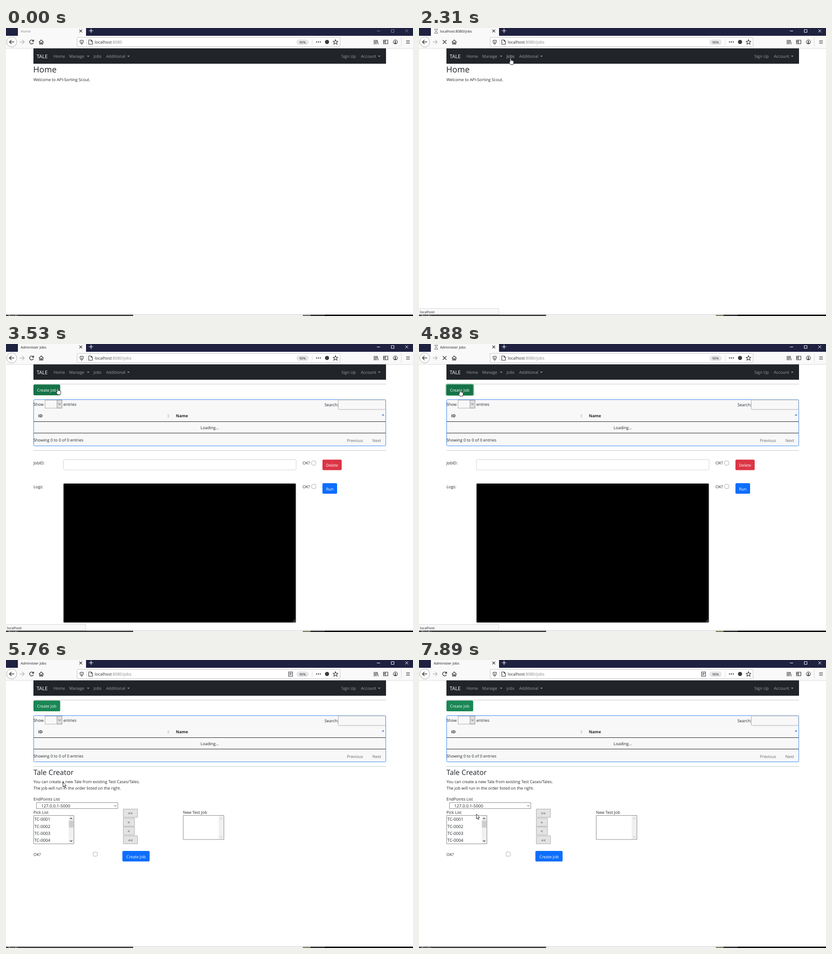
These frames come from a looping animation (890 by 629 pixels, 7990 ms). An HTML page:

```html
<!DOCTYPE html>
<html lang="en">
<head>
<meta charset="utf-8">
<title>Administer Jobs</title>
<style>
html, body { margin: 0; width: 100%; height: 100%; overflow: hidden; background: #fff; }
svg { display: block; width: 890px; height: 629px; font: 8.85px "Open Sans", "Noto Sans", sans-serif; fill: #212529; text-rendering: geometricPrecision; }
text { white-space: pre; }
.small { font-size: 7.7px; }
.num { font-size: 9.25px; }
.mid { text-anchor: middle; }
.white { fill: #fff; }
.nav { fill: #9a9da0; }
.bold { font-weight: 700; }
.line { fill: none; stroke: #3a3a3e; stroke-width: 1.2; }
.box { fill: #fff; stroke: #8a8a8a; stroke-width: 1; }
.field { fill: #fff; stroke: #ced4da; }
.key { fill: #e3e3e3; stroke: #adadad; }
.rule { stroke: #c4c5c6; }
.blue { fill: #0d6efd; }
</style>
</head>
<body>
<svg viewBox="0 0 890 629">
  <!-- browser window -->
  <path fill="#1f2140" d="M0 0H890V17H0Z"/>
  <path fill="#f9f9fa" d="M26 0H175V17H890V44H0V17H26Z"/>
  <path stroke="#dcdcde" d="M0 44.5H890"/>
  <text class="small" id="tab" x="32" y="10"></text>
  <path class="line" id="glass" stroke-width="1" d="M33.5 2.5H41.5M33.5 11.5H41.5M35 3V5L40 9V11M40 3V5L35 9V11" style="stroke:#777;stroke-width:1"/>
  <path class="line" d="M160.500 3.500L166.500 9.500M166.500 3.500L160.500 9.500"/>
  <path stroke="#fff" stroke-width="1.2" d="M181.500 6H190.500M186 1.500V10.500"/>
  <path id="controls" fill="none" d="M811 6.500H818M842.500 3.500H848.500V9.500H842.500ZM873 3L879.500 9.500M879.500 3L873 9.500"/>

  <circle cx="12.500" cy="30.500" r="11" fill="#fff" stroke="#aaa"/>
  <path class="line" style="stroke-width:1.5" d="M18 30.500H8M12 26L7.500 30.500L12 35"/>
  <path class="line" style="stroke:#b8b8ba;stroke-width:1.4" d="M30 30.500H39.500M35.500 26L40 30.500L35.500 35"/>
  <path class="line" id="reload" style="stroke-width:1.4" d="M59.500 28A4.300 4.300 0 1 0 60 32M60.500 25.500V29H57"/>
  <path class="line" id="stop" style="stroke-width:1.4" d="M52 26.500L60 34.500M60 26.500L52 34.500"/>
  <path class="line" style="stroke-width:1.4" d="M72 31L77 26L82 31M73.500 30V35H76V32H78V35H80.500V30"/>

  <rect x="155.500" y="20.500" width="575" height="20" rx="1.500" fill="#fff" stroke="#c8c8ca"/>
  <path class="line" d="M162 27Q165.500 27 165.500 26Q165.500 27 169 27Q169.500 33 165.500 35.500Q161.500 33 162 27M165.500 29V33"/>
  <path stroke="#d8d8da" d="M176.500 24V37M669.500 24V37M864.500 20V41"/>
  <path class="line" d="M181 26H186L189 29V35.500H181ZM186 26V29H189"/>
  <text x="194" y="34">localhost<tspan id="path" fill="#858588"></tspan></text>
  <path class="line" id="reader" d="M618 26H626.500V35.500H618ZM620 28.500H624.500M620 30.500H624.500M620 32.500H623"/>
  <rect x="635" y="25" width="27" height="12" rx="6" fill="#e6e6e9"/>
  <text class="mid" x="648.500" y="33.600" font-size="7.200">90%</text>
  <g fill="#3a3a3e"><circle cx="679" cy="30.500" r="1.300"/><circle cx="683.200" cy="30.500" r="1.300"/><circle cx="687.400" cy="30.500" r="1.300"/><circle cx="702" cy="30.500" r="4.500"/></g>
  <path class="line" d="M720.500 25.500L722 29H725.500L723 31.500L724 35.500L720.500 33.300L717 35.500L718 31.500L715.500 29H719Z"/>
  <path class="line" d="M805 26V35.500M807.500 26V35.500M810 26V35.500M811.500 26.500L814 35.500M825.500 26.500H835V34.500H825.500ZM829.500 26.500V34.500M826 29H829M826 31H829"/>
  <circle class="line" cx="851.500" cy="30.500" r="4.500"/>
  <path fill="#3a3a3e" d="M849 34Q849 31.500 851.500 31.500T854 34ZM850 29.300a1.500 1.500 0 1 1 3 0a1.500 1.500 0 1 1 -3 0"/>
  <path class="line" d="M875 27.500H883M875 30.500H883M875 33.500H883"/>

  <!-- site navigation -->
  <path fill="#212529" d="M60 44.500H831V78H60Z"/>
  <text class="white" x="67" y="66" font-size="11">TALE</text>
  <g class="nav">
    <text x="104" y="65">Home</text><text x="138" y="65">Manage</text>
    <text id="jobs" x="191.500" y="65">Jobs</text><text x="219" y="65">Additional</text>
    <text x="733.500" y="65">Sign Up</text><text x="776" y="65">Account</text>
    <path d="M177 60.500h5.400l-2.700 2.700zM265 60.500h5.400l-2.700 2.700zM813.500 60.500h5.400l-2.700 2.700z"/>
  </g>

  <g id="home">
    <text x="59.500" y="97" font-size="18">Home</text>
    <text x="60" y="116">Welcome to API-Sorting Scout.</text>
  </g>

  <g id="admin">
    <path class="rule" d="M60 87.500H831M60 232.500H831"/>
    <rect id="ring" x="58" y="86.500" width="62.500" height="27" rx="4" fill="#8cc3a9"/>
    <rect id="create" x="60" y="88.500" width="58.500" height="23.500" rx="2.500"/>
    <text class="mid white" x="89" y="104">Create Job</text>
    <rect x="60.500" y="121.500" width="770" height="101" rx="2" fill="#f8f8f8" stroke="#3d88ec"/>
    <text x="60" y="135">Show</text>
    <rect x="85.500" y="122.500" width="37" height="17.500" fill="#f8f8f8" stroke="#aaa"/>
    <path fill="#dedede" stroke="#999" d="M111.500 122.500h11v17.500h-11z"/>
    <path class="line" d="M114.500 130l2.500 2.500l2.500 -2.500" style="stroke-width:1"/>
    <text x="125.500" y="135">entries</text>
    <text x="696.500" y="136">Search:</text>
    <rect x="726.500" y="122" width="103.500" height="21" rx="1.500" fill="#f8f8f8" stroke="#aaa"/>
    <text class="bold" x="70.500" y="160">ID</text><text class="bold" x="371.500" y="160">Name</text>
    <g id="sort"><path fill="#cfcfd2" d="M352.500 156.500l2.500 -3.500l2.500 3.500zM352.500 157.500h5l-2.500 3.500z"/><path fill="#6f8fd0" d="M821.500 156.500l3 -4l3 4z"/></g>
    <path stroke="#222" d="M61 169.500H830M61 194.500H830"/>
    <text class="mid" x="445.500" y="185.500">Loading...</text>
    <text x="60" y="213">Showing 0 to 0 of 0 entries</text>
    <text x="745.500" y="213.500" fill="#666">Previous</text><text x="801" y="213.500" fill="#666">Next</text>
  </g>

  <g id="logs">
    <text x="60" y="263">JobID:</text><text x="60" y="315">Logs:</text>
    <rect class="field" x="125.500" y="252.500" width="509" height="22.500" rx="2.500"/>
    <rect x="125.500" y="304.500" width="508.500" height="304" rx="2" stroke="#b8bcc0" fill="#000"/>
    <path stroke="#ddd" stroke-dasharray="1 1" d="M627.500 607V605M629.500 607V603M631.500 607V601"/>
    <text x="648.500" y="263">OK?</text><text x="648.500" y="315">OK?</text>
    <rect class="box" x="668.500" y="255.500" width="9" height="9" rx="2" style="stroke:#aaa"/>
    <rect class="box" x="668.500" y="306.500" width="9" height="9" rx="2" style="stroke:#aaa"/>
    <rect x="692" y="252.500" width="42" height="23" rx="2.500" fill="#dc3545"/>
    <text class="mid white" x="713" y="268">Delete</text>
    <rect class="blue" x="692" y="304" width="32" height="23" rx="2.500"/>
    <text class="mid white" x="708" y="319.500">Run</text>
  </g>

  <g id="creator">
    <text x="60" y="250.500" font-size="15.700">Tale Creator</text>
    <text x="60" y="269">You can create a new Tale from existing Test Cases/Tales.</text>
    <text x="60" y="283">The job will run in the order listed on the right.</text>
    <text x="60" y="307">EndPoints List</text>
    <path id="select" class="box" d="M66.500 311.500H244.500V324.500H66.500Z"/>
    <path id="arrow" fill="#cce4f7" stroke="#3a8fd8" d="M234.500 311.500h10v13h-10z"/>
    <path class="line" d="M236.500 317l2.500 2.500l2.500 -2.500" style="stroke-width:1"/>
    <text class="num" x="77" y="321.500">127.0.0.1-5000</text>
    <text x="60" y="336">Pick List</text>
    <path class="box" d="M60.500 339.500h88v62h-88z"/>
    <path fill="#f0f0f0" d="M137 340h11v61h-11zM465 340h11v52h-11z"/>
    <path fill="#cdcdcd" d="M137.500 351h10v15h-10z"/>
    <path class="line" d="M140 347.500l2.500 -2.500l2.500 2.500M140 394l2.500 2.500l2.500 -2.500"/>
    <g class="num"><text x="62" y="351">TC-0001</text><text x="62" y="366.500">TC-0002</text><text x="62" y="381.500">TC-0003</text><text x="62" y="396.500">TC-0004</text></g>
    <path class="key" d="M256.500 325.500h31v18h-31zM256.500 345.500h24.500v17.500h-24.500zM256.500 364.500h24.500v17.500h-24.500zM256.500 384h31v17.500h-31z"/>
    <g class="mid"><text x="272" y="338">&gt;&gt;</text><text x="268.500" y="357.500">&gt;</text><text x="268.500" y="377">&lt;</text><text x="272" y="396.500">&lt;&lt;</text></g>
    <text x="387" y="335.500">New Test Job</text>
    <path class="box" style="fill:none" d="M387.500 339.500h89v52.500h-89z"/>
    <path class="line" style="stroke:#aaa;stroke-width:1" d="M468 347.500l2.500 -2.500l2.500 2.500M468 385l2.500 2.500l2.500 -2.500"/>
    <text x="60" y="427.500">OK?</text>
    <rect class="box" x="190.500" y="419.500" width="9" height="9" rx="2" style="stroke:#aaa"/>
    <rect class="blue" x="254.500" y="417" width="59.500" height="23" rx="2.500"/>
    <text class="mid white" x="284.500" y="432.500">Create Job</text>
    <g id="drop" class="num">
      <path class="box" d="M66.500 324.500h178v59.500h-178z"/>
      <path fill="#0078d7" d="M67 325h177v19.500h-177z"/>
      <text class="white" x="71" y="338.500">127.0.0.1-5000</text><text x="71" y="358">192.168.0.162_5000</text><text x="71" y="378">localhost-8888</text>
    </g>
  </g>

  <!-- window behind -->
  <path fill="#444" d="M0 626H278V629H0Z"/>
  <path stroke="#bbb" d="M278 626.500H649"/>
  <path id="patch" d="M649 626H666V629H649Z"/>
  <path fill="#333" d="M666 626H697V629H666Z"/>
  <path fill="#000" d="M697 626H890V629H697Z"/>
  <text class="white small" x="5" y="631.500">Ready</text>
  <g id="status"><path fill="#f9f9fa" stroke="#d8d8da" d="M-1 612.500H174.500V625.500H-1Z"/><text class="small" x="2" y="622.500">localhost</text></g>

  <g id="cursor" fill="#fff" stroke="#111" stroke-width=".9" stroke-linejoin="round">
    <path id="pointer" d="M.5 .5V11L2.800 8.800L4.400 12.500L6.100 11.800L4.500 8.200H7.800Z"/>
    <path id="hand" d="M0 1Q1.200 -.5 2.200 1V5.500Q3.500 4.500 4.300 5.800Q5.600 5 6.300 6.300Q7.800 5.800 8 7.500V11L6.800 14.500H1L-2 9.500Q-2.500 7.500 0 9Z"/>
  </g>
</svg>
<script>
const LOOP = 7990, $ = id => document.getElementById(id);

// Each move: first step, last step, number of steps, end x, end y
const moves = [
  [190, 190, 1, 798, 548], [300, 520, 3, 577, 431], [740, 740, 1, 425, 354],
  [970, 1760, 8, 204, 73], [1870, 1970, 2, 199, 65.5], [3080, 3310, 3, 135, 93],
  [3530, 3650, 2, 88.500, 99.500], [5430, 5880, 5, 133, 308], [6210, 6210, 1, 137, 314],
  [6870, 7100, 3, 117.500, 332], [7770, 7890, 2, 125, 336]
];

function cursorAt(t) {
  let x = 798, y = 548;
  for (const [from, to, n, endX, endY] of moves) {
    if (t < from) break;
    const gap = n > 1 ? (to - from) / (n - 1) : 1;
    const part = Math.min(n, Math.floor((t - from + 8) / gap) + 1) / n;
    x += (endX - x) * part;
    y += (endY - y) * part;
  }
  return [x, y];
}

function draw(t) {
  const within = (a, b = LOOP) => t >= a && t < b;
  const show = (id, on) => $(id).style.display = on ? "" : "none";
  const loading = within(2310, 2420) || within(4760, 4980);
  const active = within(2200), admin = within(2420), creator = within(4980);
  const hand = within(1870, 3080) || within(3530, 5430);

  $("tab").textContent = admin ? "Administer Jobs" : within(2310) ? "localhost:8080/jobs" : "Home";
  $("tab").setAttribute("x", loading || within(2310, 2540) ? 46 : 32);
  $("tab").style.fill = active ? "#1c1c1e" : "#85858a";
  $("controls").style.stroke = active ? "#fff" : "#85879a";
  $("path").textContent = within(2310) ? ":8080/jobs" : ":8080";
  $("patch").style.fill = active ? "#8b8b74" : "#777";
  $("jobs").style.fill = within(1870, 2420) ? "#c8c9ca" : "";
  $("create").style.fill = within(3530, 5430) ? "#157347" : "#198754";
  $("select").style.stroke = within(6210, 7440) ? "#555" : "";

  show("glass", loading);
  show("stop", loading);
  show("reload", !loading);
  show("reader", creator);
  show("home", !admin);
  show("admin", admin);
  show("sort", within(2540));
  show("ring", within(4650, 4980));
  show("logs", admin && !creator);
  show("creator", creator);
  show("arrow", within(6210, 7440));
  show("drop", within(6320, 7320));
  show("status", within(2200, 2420) || within(3530, 4980));
  show("cursor", within(190));
  show("hand", hand);
  show("pointer", !hand);
  $("cursor").setAttribute("transform", `translate(${cursorAt(t)})`);
}

function tick(now) {
  draw(now % LOOP);
  requestAnimationFrame(tick);
}
draw(0);
requestAnimationFrame(tick);
</script>
</body>
</html>
```
